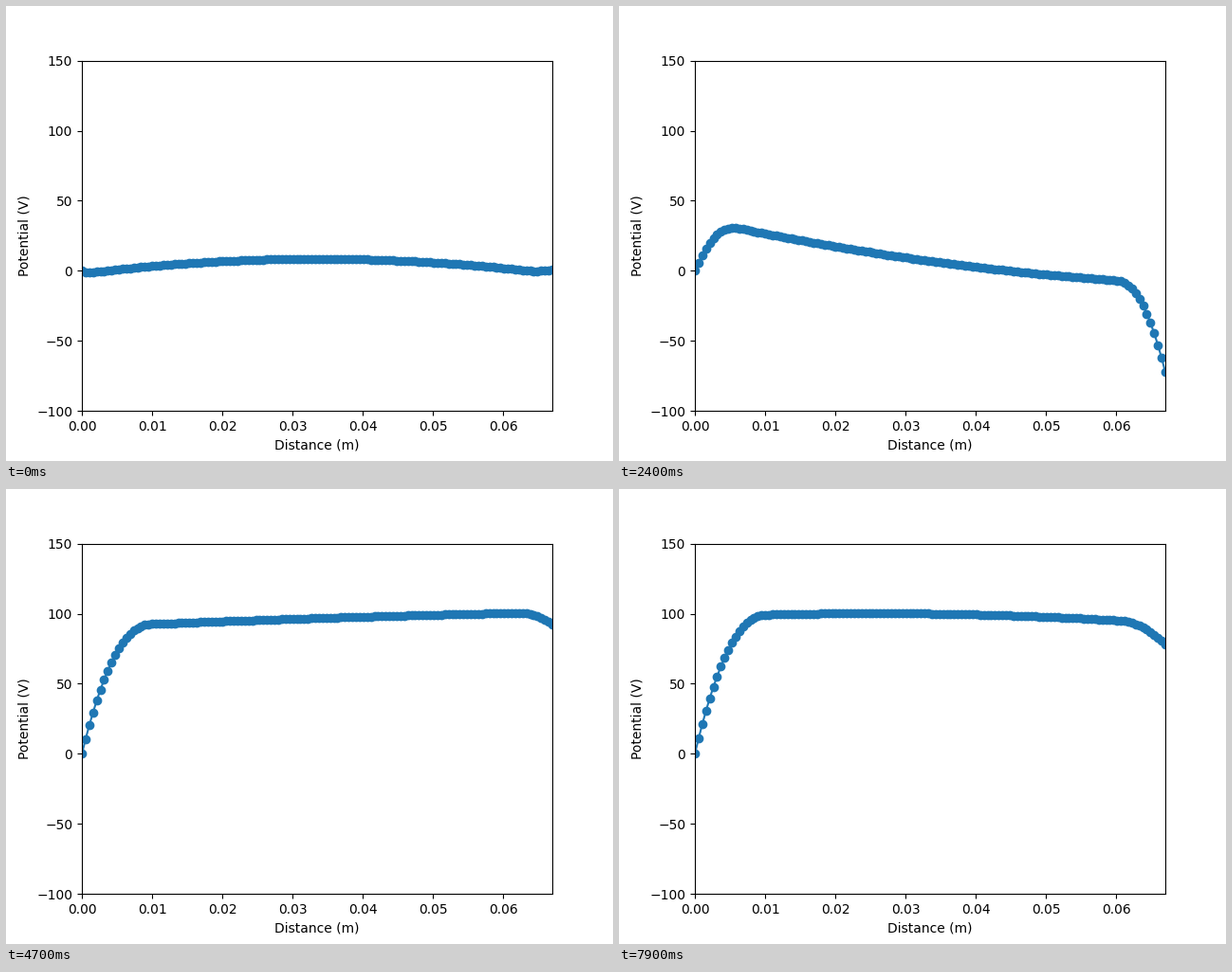
A matplotlib script that plays this animation: 640 by 480 pixels, repeating every 8000 ms.

```python
import numpy as np
import matplotlib.pyplot as plt
from matplotlib.animation import FuncAnimation

FRAMES, STEP_MS = 80, 100
LENGTH, POINTS = 0.067, 128
RF_HZ, DT, V_RF = 13.56e6, 5e-9, 100.0
PHASE = np.radians(0.5)

x = np.linspace(0, LENGTH, POINTS)
idx = np.arange(POINTS)
u = x / LENGTH

# step: bulk potential at the left wall, the middle and the right wall
KEYS = {
    0: (-2, 8.5, -2),
    12: (6.5, 49, 72),
    24: (37, 7, -9),
    33: (88, 99, 122),
    47: (90.5, 96.8, 101),
    67: (17, 33, 34),
    79: (97.5, 100, 93),
}


def drive(step):
    return np.sin(2 * np.pi * RF_HZ * DT * step + PHASE)


def plasma(step):
    """Mean plasma potential, with a start-up overshoot that dies out."""
    s = drive(step)
    overshoot = 65 * np.exp(-step / 12) * max(s, 0) ** 2
    return V_RF / 4 * (1 + s) ** 2 + overshoot


def bulk_profile(step):
    """Parabola through three points drifting around the mean potential."""
    offsets = [np.array(v) - plasma(k) for k, v in KEYS.items()]
    left, mid, right = (plasma(step) + np.interp(step, list(KEYS), col)
                        for col in np.transpose(offsets))
    bend = 2 * left + 2 * right - 4 * mid
    return left + (right - left) * u - bend * u * (1 - u)


def sheath(drop, width, dist):
    """Potential drop that fades out away from a wall."""
    return drop * np.clip(1 - dist / max(width, 1), 0, 1) ** 2.2


def potential(step):
    bulk = bulk_profile(step)
    left = bulk[0]
    right = bulk[-1] - V_RF * drive(step)
    left_width = 1.95 * np.sqrt(abs(left))
    growth = 0.78 + 0.95 * (step / FRAMES) ** 2
    right_width = 6.4 + growth * np.sqrt(abs(right))
    return (bulk - sheath(left, left_width, idx)
            - sheath(right, right_width, idx[::-1]))


fig, ax = plt.subplots(figsize=(6.4, 4.8), dpi=100)
line, = ax.plot(x, potential(0), "o-", color="#1f77b4")
ax.set_xlim(0, LENGTH)
ax.set_ylim(-100, 150)
ax.set_xlabel("Distance (m)")
ax.set_ylabel("Potential (V)")


def update(step):
    line.set_ydata(potential(step))
    return line,


anim = FuncAnimation(fig, update, frames=FRAMES, interval=STEP_MS,
                     repeat=True, repeat_delay=0, blit=False)
plt.show()
```
